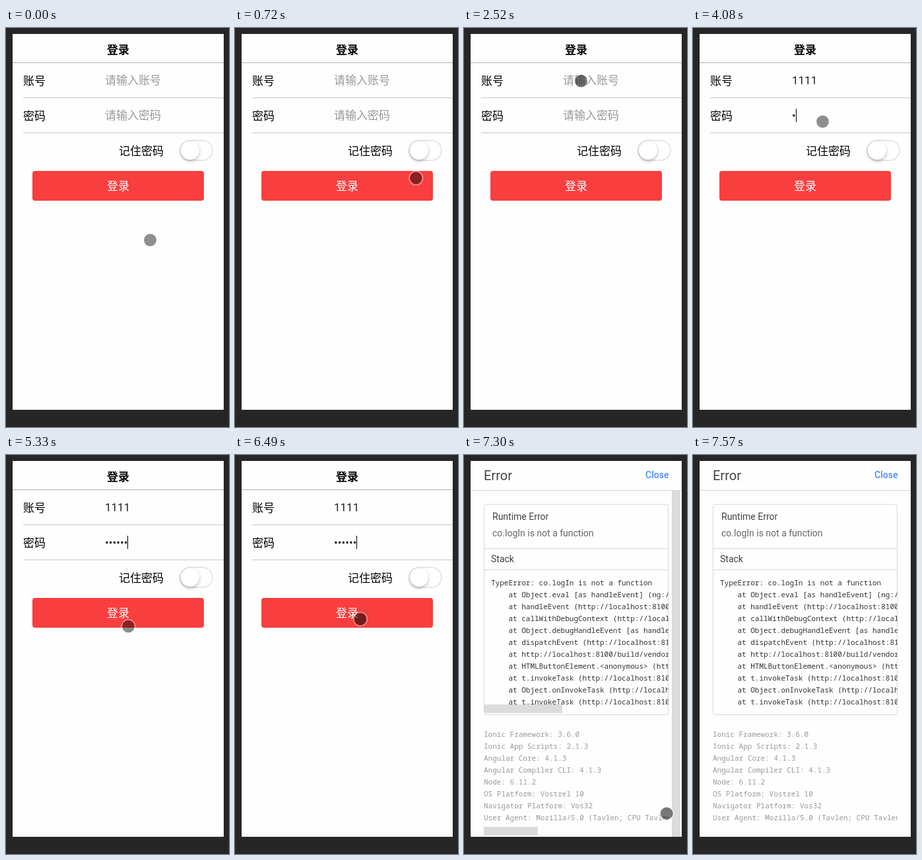
Animation, 338 px wide and 603 px high, one loop 7720 ms. Source, as an HTML page with a canvas:

```html
<!DOCTYPE html>
<html lang="zh-CN">
<head>
<meta charset="utf-8">
<title>登录</title>
<style>
html, body { margin: 0; width: 100%; height: 100%; overflow: hidden; background: #262626; }
canvas { display: block; width: 338px; height: 603px; }
</style>
</head>
<body>
<canvas id="stage" lang="zh-CN"></canvas>
<script>
const W = 338, H = 603, LOOP = 7720;
const STEP = LOOP / 55;
const BLINK = 560;
const CJK = '17px "Noto Sans CJK SC", "Noto Sans CJK", "Noto Sans", sans-serif';
const LABEL = '350 ' + CJK;
const ROBOTO = 'Roboto, sans-serif';
const MONO = '11px "Noto Sans Mono", "DejaVu Sans Mono", monospace';
const LINE = '#d8d8d8';

const canvas = document.getElementById('stage');
const ctx = canvas.getContext('2d');
const dpr = window.devicePixelRatio || 1;
canvas.width = W * dpr;
canvas.height = H * dpr;

// The pointer rests between these moves.
const start = { x: 218.5, y: 320.5 };
const moves = [
  { from: 150, to: 1010, x: 297.5, y: 188 },
  { from: 1400, to: 1960, x: 177.5, y: 80 },
  { from: 3500, to: 3770, x: 196.5, y: 141.5 },
  { from: 4080, to: 4700, x: 212, y: 329 },
  { from: 4850, to: 5330, x: 185.5, y: 259 },
  { from: 5330, to: 5590, x: 190, y: 248 },
  { from: 6740, to: 6880, x: 212.5, y: 263.5 },
  { from: 6880, to: 7440, x: 325, y: 594 }
];
const account = {
  hint: '请输入账号', char: '1', length: 4, y: 85,
  focus: 1960, blur: 4080, firstKey: 3080, gap: 140
};
const password = {
  hint: '请输入密码', char: '•', length: 6, y: 138,
  focus: 4080, blur: 6770, firstKey: 4080, gap: 250
};

const stackLines = [
  'TypeError: co.logIn is not a function',
  '    at Object.eval [as handleEvent] (ng:///',
  '    at handleEvent (http://localhost:8100/',
  '    at callWithDebugContext (http://localhost',
  '    at Object.debugHandleEvent [as handleEvent]',
  '    at dispatchEvent (http://localhost:8100/',
  '    at http://localhost:8100/build/vendor.js',
  '    at HTMLButtonElement.<anonymous> (http://',
  '    at t.invokeTask (http://localhost:8100/',
  '    at Object.onInvokeTask (http://localhost',
  '    at t.invokeTask (http://localhost:8100/'
];
const infoLines = [
  'Ionic Framework: 3.6.0',
  'Ionic App Scripts: 2.1.3',
  'Angular Core: 4.1.3',
  'Angular Compiler CLI: 4.1.3',
  'Node: 6.11.2',
  'OS Platform: Vostrel 10',
  'Navigator Platform: Vos32',
  'User Agent: Mozilla/5.0 (Tavlen; CPU Tavlen OS'
];

const clamp = (v, lo = 0, hi = 1) => Math.max(lo, Math.min(hi, v));
const ramp = (t, from, to) => clamp((t - from) / (to - from));
const smooth = p => p * p * (3 - 2 * p);
const mix = (a, b, p) => a + (b - a) * p;

function rect(x, y, w, h, color) {
  ctx.fillStyle = color;
  ctx.fillRect(x, y, w, h);
}

function text(s, x, y, font, color) {
  ctx.font = font;
  ctx.fillStyle = color;
  ctx.fillText(s, x, y);
}

function roundRect(x, y, w, h, r) {
  ctx.beginPath();
  ctx.moveTo(x + r, y);
  ctx.arcTo(x + w, y, x + w, y + h, r);
  ctx.arcTo(x + w, y + h, x, y + h, r);
  ctx.arcTo(x, y + h, x, y, r);
  ctx.arcTo(x, y, x + w, y, r);
  ctx.closePath();
}

function fillRound(x, y, w, h, r, color) {
  roundRect(x, y, w, h, r);
  ctx.fillStyle = color;
  ctx.fill();
}

function circle(x, y, r) {
  ctx.beginPath();
  ctx.arc(x, y, r, 0, Math.PI * 2);
}

function pointerAt(t) {
  return moves.reduce((pos, m) => {
    const p = smooth(ramp(t, m.from, m.to));
    return { x: mix(pos.x, m.x, p), y: mix(pos.y, m.y, p) };
  }, start);
}

function drawField(field, t) {
  const count = clamp(Math.floor((t - field.firstKey) / field.gap) + 1, 0, field.length);
  const value = field.char.repeat(count);
  if (count) text(value, 150, field.y, '17px ' + ROBOTO, '#222');
  else text(field.hint, 150, field.y, LABEL, '#999');

  const lastInput = count ? field.firstKey + (count - 1) * field.gap : field.focus;
  const lit = Math.floor((t - lastInput) / BLINK) % 2 === 0;
  if (t < field.focus || t >= field.blur || !lit) return;
  const width = count ? ctx.measureText(value).width : 0;
  rect(150 + Math.round(width), field.y - 16, 1, 20, '#000');
}

function drawToggle(on) {
  const red = mix(230, 72, on), green = mix(230, 138, on), blue = mix(230, 255, on);
  fillRound(263, 169, 51, 32, 16, `rgb(${red}, ${green}, ${blue})`);
  const off = 1 - on;
  if (off) fillRound(288.5 - 23.5 * off, 185 - 14 * off, 47 * off, 28 * off, 14 * off, '#fff');

  ctx.save();
  circle(mix(279, 297, on), 185, 14);
  ctx.fillStyle = '#fff';
  ctx.shadowColor = 'rgba(0, 0, 0, .28)';
  ctx.shadowBlur = 5 * dpr;
  ctx.shadowOffsetY = 2 * dpr;
  ctx.fill();
  ctx.restore();
}

function drawLogin(t, frameTime) {
  text('登录', 153, 38.5, 'bold ' + CJK, '#000');
  rect(10, 52, 320, 1, '#b2b2b2');
  rect(26, 105, 304, 1, '#c8c7cc');
  rect(26, 158, 304, 1, '#c8c7cc');
  text('账号', 26, 86, LABEL, '#000');
  text('密码', 26, 139, LABEL, '#000');
  drawField(account, t);
  drawField(password, t);

  text('记住密码', 171, 192, LABEL, '#000');
  drawToggle(ramp(frameTime, 900, 1120) - ramp(frameTime, 1480, 1680));
  fillRound(40, 216, 260, 45, 4, '#f83e3e');
  text('登录', 153, 245, LABEL, '#fff');
}

function drawError(frameTime) {
  ctx.save();
  ctx.globalAlpha = ramp(frameTime, 6640, 6960);
  rect(10, 9, 320, 568, '#fefefe');
  text('Error', 30, 38, '20px ' + ROBOTO, '#424242');
  text('Close', 275, 35, '500 14px ' + ROBOTO, '#488aff');
  rect(10, 53, 320, 1, LINE);

  roundRect(30.5, 74.5, 279, 318, 3);
  ctx.strokeStyle = LINE;
  ctx.lineWidth = 1;
  ctx.stroke();
  rect(31, 141, 278, 1, LINE);
  rect(31, 173, 278, 1, LINE);
  const body = '14px ' + ROBOTO;
  text('Runtime Error', 43, 98, body, '#424242');
  text('co.logIn is not a function', 43, 123, body, '#666');
  text('Stack', 41, 162, body, '#424242');

  ctx.save();
  ctx.beginPath();
  ctx.rect(30, 174, 279.5, 403);
  ctx.clip();
  stackLines.forEach((s, i) => text(s, 41, 197 + 18 * i, MONO, '#333'));
  infoLines.forEach((s, i) => text(s, 30, 426 + 18 * i, MONO, '#999'));
  ctx.restore();

  // Scrollbars fade out after the page opens.
  ctx.globalAlpha *= 1 - ramp(frameTime, 7160, 7560);
  rect(315, 54, 13, 523, '#cacaca');
  rect(31, 377, 118, 13, '#cacaca');
  rect(30, 562, 82, 13, '#cacaca');
  ctx.restore();
}

function drawPointer({ x, y }, pressed) {
  circle(x, y, 9.5);
  ctx.fillStyle = `rgba(0, 0, 0, ${pressed ? 0.53 : 0.44})`;
  ctx.fill();
  circle(x, y, 10.3);
  ctx.strokeStyle = 'rgba(255, 255, 255, .4)';
  ctx.lineWidth = 1.6;
  ctx.stroke();
}

function draw(t) {
  const frameTime = Math.floor((t + 24) / STEP) * STEP;
  ctx.setTransform(dpr, 0, 0, dpr, 0, 0);
  rect(0, 0, W, H, '#262626');
  rect(10, 9, 320, 568, '#fefefe');
  drawLogin(t, frameTime);
  drawError(frameTime);
  const pressed = (t >= 1960 && t < 3500) || t >= 5590;
  if (frameTime < 7560) drawPointer(pointerAt(frameTime), pressed);
}

function tick() {
  draw(performance.now() % LOOP);
  requestAnimationFrame(tick);
}
tick();
</script>
</body>
</html>
```
